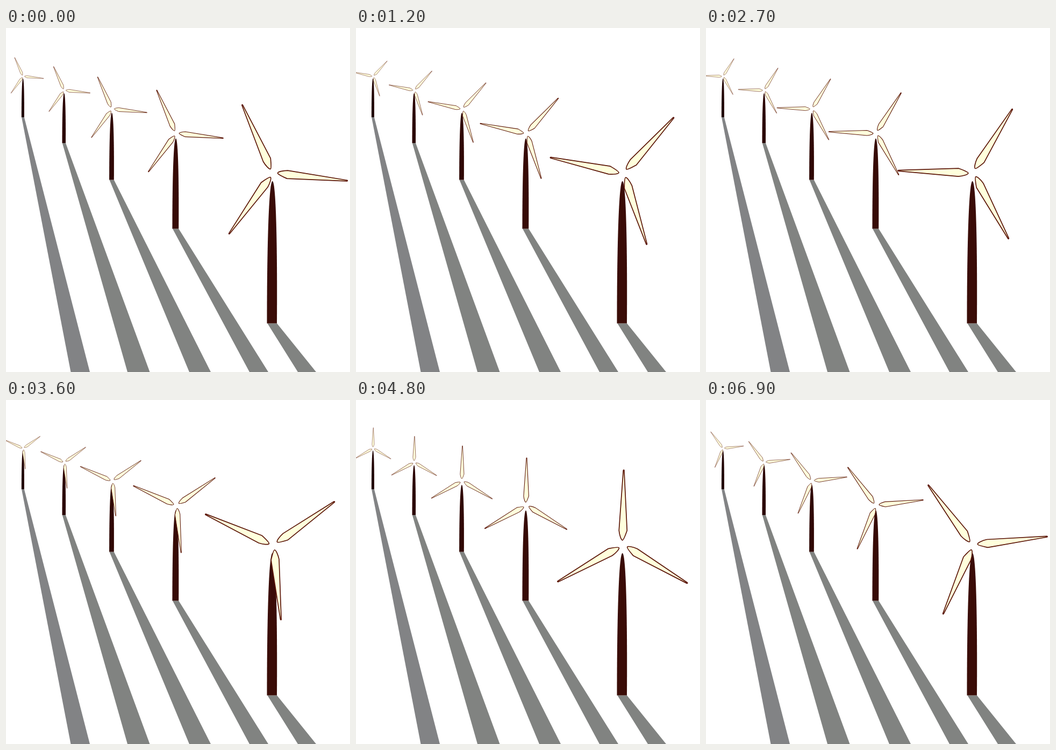
An HTML page with a canvas that plays this animation: 640 by 640 pixels, repeating every 7000 ms.

```html
<!DOCTYPE html>
<html lang="en">
<head>
<meta charset="utf-8">
<title>Wind turbines</title>
<style>
  html, body { margin: 0; width: 100%; height: 100%; overflow: hidden; background: #fff; }
  canvas { display: block; }
</style>
</head>
<body>
<canvas id="stage" width="640" height="640"></canvas>
<script>
const ctx = document.getElementById('stage').getContext('2d');
const LOOP = 7000;
const STEP = 360 / 58;   // degrees per 40 ms tick
const START = 5.85;

// Paths are relative to the rotor hub of the nearest turbine.
const blade = new Path2D('M8.9,-.9 C8.9,-3.4 18,-6.6 27,-7.6 L138.8,-.9 Q140.4,0 138.8,.7 L27,7.4 C19.5,4.8 8.9,1.4 8.9,-.9 Z');
const tower = new Path2D('M-11.7,279.5 C-11.7,130 -8,15 -1.5,15 C5,15 7.8,130 6.8,279.5 Z');

// Far to near; left and right are the shadow's ends on the bottom edge.
const turbines = [
  { x: 32, y: 90, size: .276, base: 166, left: 120.5, right: 156, color: '#200303', shade: '#828385' },
  { x: 108.6, y: 116, size: .348, base: 214, left: 226, right: 267.5, color: '#2b0504', shade: '#818381' },
  { x: 197.6, y: 150.7, size: .47, base: 282.5, left: 341, right: 381, color: '#2f0704', shade: '#818381' },
  { x: 316.9, y: 196, size: .633, base: 373.5, left: 453, right: 488, color: '#370b06', shade: '#818381' },
  { x: 497.2, y: 270, size: 1, base: 549.5, left: 543, right: 577, color: '#3a0c07', shade: '#818381' }
];

function drawShadow({ x, y, base, left, right, shade }) {
  const scale = (base - y) / 279.5;
  ctx.fillStyle = shade;
  ctx.beginPath();
  ctx.moveTo(x - 10.9 * scale, base);
  ctx.lineTo(x + 6.8 * scale, base);
  ctx.lineTo(right, 640);
  ctx.lineTo(left, 640);
  ctx.fill();
}

function drawTower({ x, y, base, color }) {
  const scale = (base - y) / 279.5;
  ctx.save();
  ctx.translate(x, y);
  ctx.scale(scale, scale);
  ctx.fillStyle = color;
  ctx.fill(tower);
  ctx.restore();
}

function drawRotor({ x, y, size }, degrees) {
  ctx.save();
  ctx.translate(x, y);
  ctx.scale(size, size);
  ctx.rotate(degrees * Math.PI / 180);
  ctx.translate(-.7, 0);   // the rotor is slightly off its axle
  ctx.rotate(START * Math.PI / 180);
  ctx.fillStyle = '#ffffdc';
  ctx.strokeStyle = '#5c1608';
  ctx.lineWidth = 1.7;
  ctx.lineJoin = 'round';
  for (let i = 0; i < 3; i++) {
    ctx.fill(blade);
    ctx.stroke(blade);
    ctx.rotate(Math.PI * 2 / 3);
  }
  ctx.restore();
}

function draw() {
  // The picture changes every 100 ms, landing on whole 40 ms ticks.
  const shown = Math.floor(performance.now() % LOOP / 100) * 100;
  const degrees = Math.floor(shown / 40) * STEP;
  ctx.fillStyle = '#fff';
  ctx.fillRect(0, 0, 640, 640);
  for (const turbine of turbines) {
    drawShadow(turbine);
    drawTower(turbine);
    drawRotor(turbine, degrees);
  }
  requestAnimationFrame(draw);
}
draw();
</script>
</body>
</html>
```
